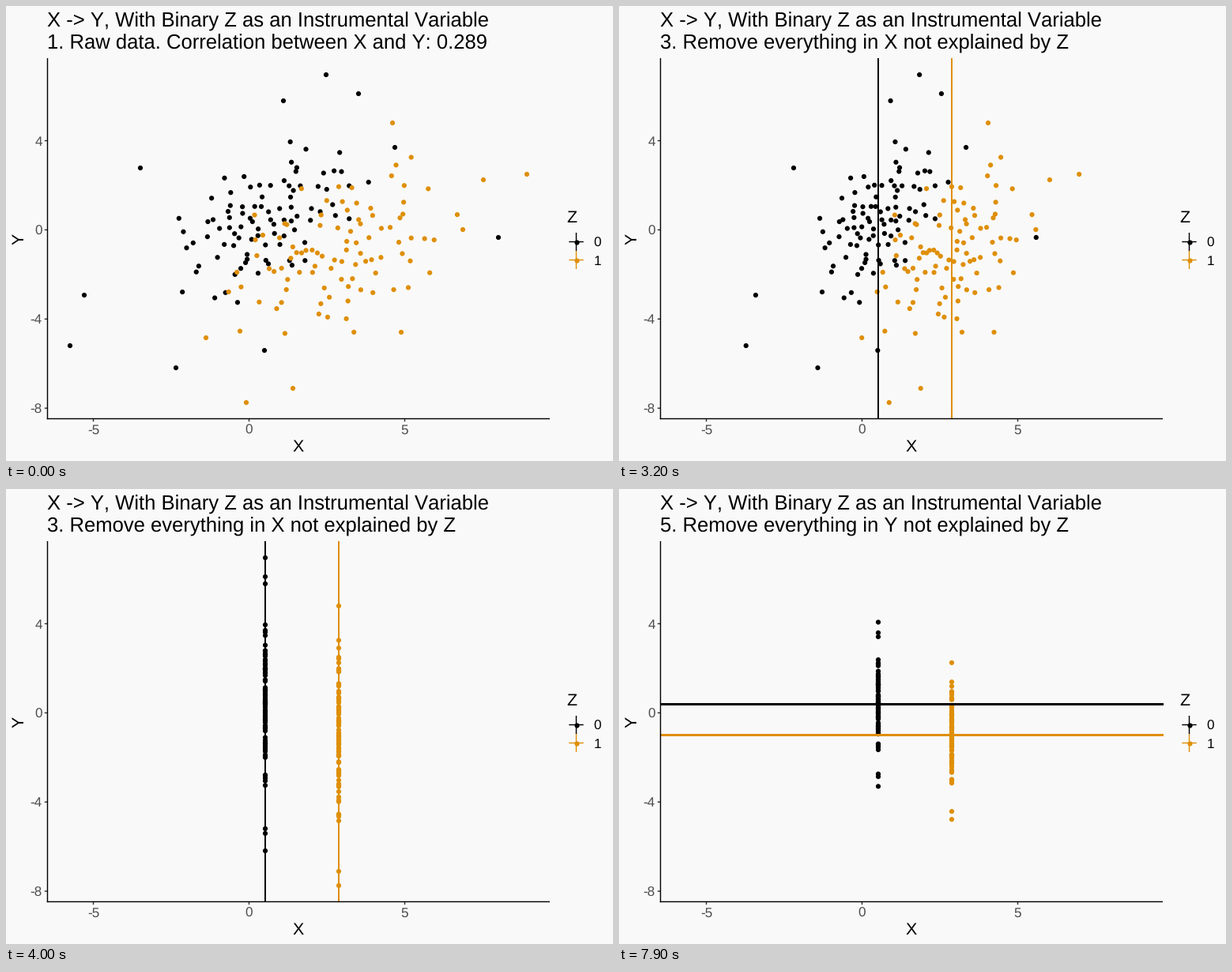
Write a matplotlib script that moves like this. It is 768 by 576 pixels and loops after 8000 ms.

```python
import numpy as np
import matplotlib.pyplot as plt
from matplotlib.animation import FuncAnimation

W, H, DPI = 768, 576, 96
STEP, LOOP = 100, 8000
BLACK, ORANGE, PAPER = "black", "#DF8F08", "#F9F9F9"
LEFT, RIGHT, TOP, BOTTOM = 52.5, 688.5, 66, 522.5

plt.rcParams.update({
    "font.family": "Liberation Sans",
    "text.hinting": "no_hinting",
    "text.kerning_factor": 6,
})

# Most extreme points of each group, in stage pixels
FAR_0 = [(81, 430), (99, 366), (170, 205), (215, 458), (327, 436),
         (405, 87), (351, 120), (446, 111), (492, 179), (623, 293)]
FAR_1 = [(489, 148), (604, 220), (659, 213), (578, 283), (500, 413),
         (363, 484), (304, 502), (253, 420)]

TITLES = [
    (0, "1. Raw data. Correlation between X and Y: 0.289"),
    (500, "2. What differences in X are explained by Z?"),
    (2800, "3. Remove everything in X not explained by Z"),
    (5100, "4. What differences in Y are explained by Z?"),
    (7400, "5. Remove everything in Y not explained by Z"),
]

rng = np.random.default_rng(7)


def cloud(far, mean, spread, corr, total=100):
    """Far points plus an evenly filled, correlated normal cloud."""
    n = total - len(far)
    i = np.arange(n)
    r = np.sqrt(-2 * np.log(1 - 0.9 * (i + rng.random(n)) / n))
    angle = i * np.pi * (3 - np.sqrt(5)) + rng.normal(0, 0.3, n)
    u, v = r * np.cos(angle), r * np.sin(angle)
    x = mean[0] + spread[0] * u
    y = mean[1] + spread[1] * (corr * u + np.sqrt(1 - corr**2) * v)
    return np.vstack([far, np.column_stack([x, y])])


def px(width):
    return width * 72 / DPI


def ease(t, start, length=1300):
    p = min(max((t - start) / length, 0), 1)
    return (1 - np.cos(np.pi * p)) / 2


fig = plt.figure(figsize=(W / DPI, H / DPI), dpi=DPI, facecolor=PAPER)
ax = fig.add_axes([0, 0, 1, 1])
ax.set_xlim(0, W)
ax.set_ylim(H, 0)
ax.axis("off")


def line(x0, y0, x1, y1, color, width, z=1):
    return ax.plot([x0, x1], [y0, y1], color=color, lw=px(width), zorder=z,
                   solid_capstyle="butt", snap=False)[0]


def label(x, y, s, size, color="black", ha="left", **kw):
    return ax.text(x, y, s, fontsize=size, color=color, ha=ha,
                   va="baseline", **kw)


def dots(points, color, z):
    # One colour per dot keeps their positions off the pixel grid
    x, y = np.transpose(points)
    return ax.scatter(x, y, s=px(6.2)**2, c=[color] * len(x), linewidths=0,
                      zorder=z)


# Axes, ticks and their labels
line(LEFT, TOP, LEFT, BOTTOM + 0.7, BLACK, 1.42, 6)
line(LEFT - 0.7, BOTTOM, 688, BOTTOM, BLACK, 1.42, 6)
for value in (-5, 0, 5):
    x = 307.5 + 39.4 * value
    line(x, BOTTOM, x, BOTTOM + 3.7, "#333333", 1.42)
    label(x, 542, str(value), 12.8, "#4D4D4D", "center")
for value in (4, 0, -4, -8):
    y = 283.4 - 28.22 * value
    line(LEFT - 3.7, y, LEFT, y, "#333333", 1.42)
    label(45.8, y + 6.2, str(value), 12.8, "#4D4D4D", "right")
label(370, 564.4, "X", 16, ha="center")
label(22.5, 294.5, "Y", 16, ha="center", rotation=90, rotation_mode="anchor")

# Legend
label(709.7, 274.3, "Z", 16)
for name, color, y in (("0", BLACK, 298.5), ("1", ORANGE, 321.5)):
    line(721.5, y - 11.5, 721.5, y + 11.5, color, 1.42)
    line(712.3, y, 730.7, y, color, 1.42)
    dots([(721.5, y)], color, 2)
    label(743.5, y + 6.3, name, 12.8)

label(52.3, 26.3, "X -> Y, With Binary Z as an Instrumental Variable", 19.2)
subtitle = label(52.3, 54.7, "", 19.2)

# Each group: points, mean position, dots, mean lines
groups = []
for far, mean, spread, corr, color, z in (
        (FAR_0, (328, 272.5), (62, 52), -0.5, BLACK, 3),
        (FAR_1, (421, 311.5), (74, 58), -0.35, ORANGE, 4)):
    mx, my = mean
    points = cloud(far, mean, spread, corr)
    groups.append((points, np.array(mean), dots(points, color, z),
                   line(mx, TOP, mx, BOTTOM, color, 2, 5),
                   line(LEFT, my, RIGHT + 0.5, my, color, 3, 5)))


def draw(i):
    t = i * STEP
    subtitle.set_text([s for start, s in TITLES if t >= start][-1])
    pull = np.array([ease(t, 2700), ease(t, 7300)])
    for points, mean, marks, vline, hline in groups:
        marks.set_offsets(points + (mean - points) * pull)
        vline.set_visible(900 <= t < 5100)
        hline.set_visible(t >= 5500)


anim = FuncAnimation(fig, draw, frames=LOOP // STEP, init_func=lambda: draw(0),
                     interval=STEP, repeat=True, repeat_delay=0)
plt.show()
```
